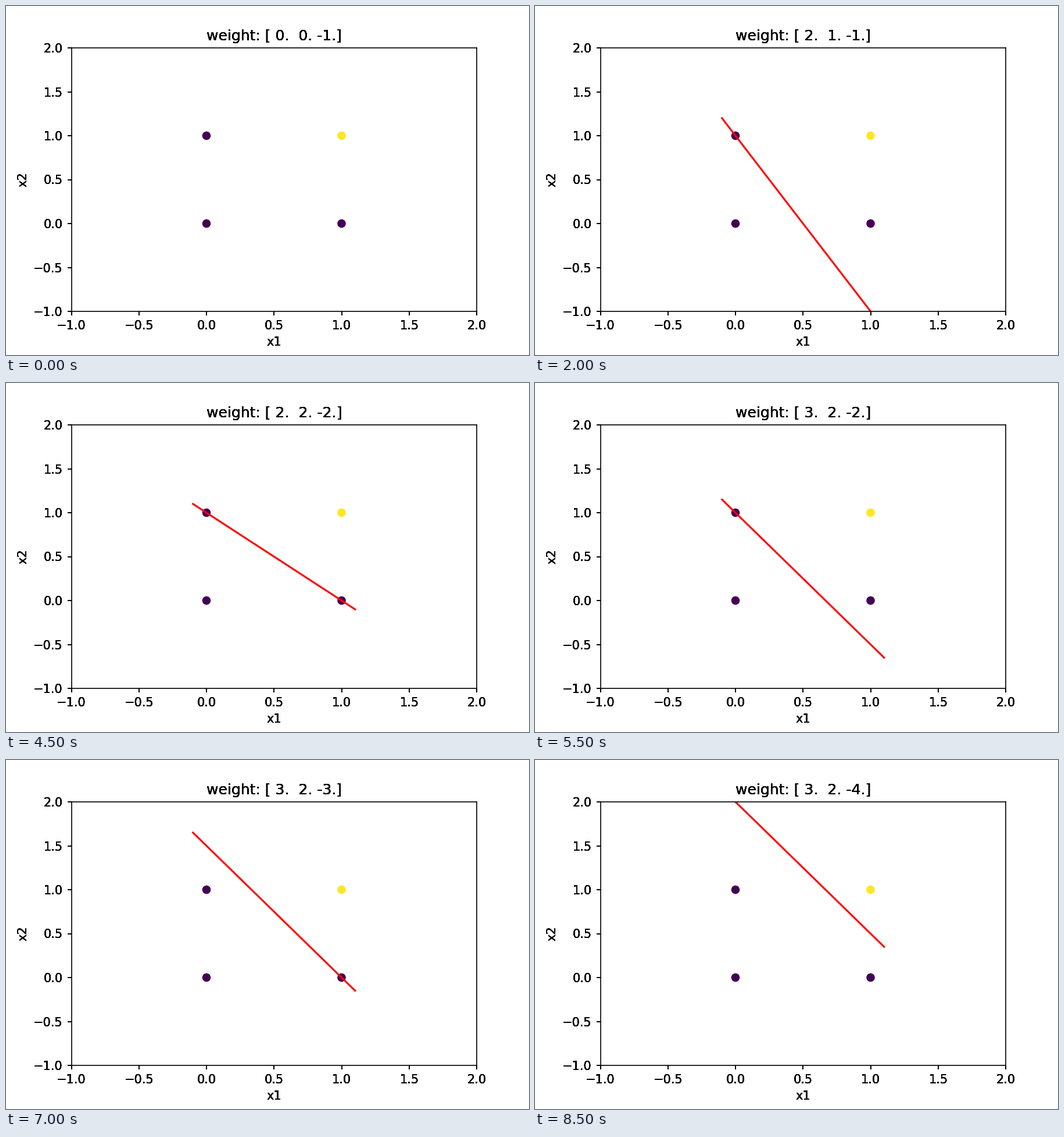
A matplotlib script for the animation above (9500 ms loop, 900 by 600 pixels).

```python
import matplotlib.pyplot as plt
import numpy as np
from matplotlib.animation import FuncAnimation

plt.rcParams["font.family"] = "DejaVu Sans"
plt.rcParams["font.size"] = 10

STEP_MS = 500
STEPS = 19
LABEL_LAYERS = 5  # stacked labels give the heavy, hard-edged lettering
BOX = (0.125, 0.125, 0.775, 0.755)
SPAN = np.array([-0.1, 1.1])

POINTS = np.array([[0, 0], [0, 1], [1, 0], [1, 1]])
LABELS = np.array([-1, -1, -1, 1])  # logical AND


def train():
    """Perceptron learning; returns the weights after every correction."""
    inputs = np.column_stack([POINTS, np.ones(len(POINTS))])
    weights = np.zeros(3)
    history = []
    changed = True
    while changed:
        changed = False
        for x, label in zip(inputs, LABELS):
            if label * (weights @ x) <= 0:
                weights = weights + label * x
                history.append(weights)
                changed = True
    return history


def boundary(weights):
    """End points of the line where the weighted sum is zero."""
    a, b, c = weights
    if b != 0:
        return SPAN, -(a * SPAN + c) / b
    if a != 0:
        return np.full(2, -c / a), SPAN
    return [], []


def add_layer(frame):
    ax = fig.add_axes(BOX, frameon=frame)
    ax.set(xlim=(-1, 2), ylim=(-1, 2), xlabel="x1", ylabel="x2")
    ticks = np.arange(-1, 2.1, 0.5)
    ax.set_xticks(ticks)
    ax.set_yticks(ticks)
    return ax


fig = plt.figure(figsize=(6, 4), dpi=150, facecolor="white")
layers = [add_layer(i == 0) for i in range(LABEL_LAYERS)]
plot = layers[0]
plot.scatter(POINTS[:, 0], POINTS[:, 1], c=LABELS, cmap="viridis")
line, = plot.plot([], [], color="red", lw=1.5)
history = train()


def draw(step):
    weights = history[min(step, len(history) - 1)]
    line.set_data(*boundary(weights))
    titles = [ax.set_title(f"weight: {weights}") for ax in layers]
    return [line, *titles]


anim = FuncAnimation(fig, draw, frames=STEPS, interval=STEP_MS,
                     repeat=True, repeat_delay=0, blit=False)
plt.show()
```
